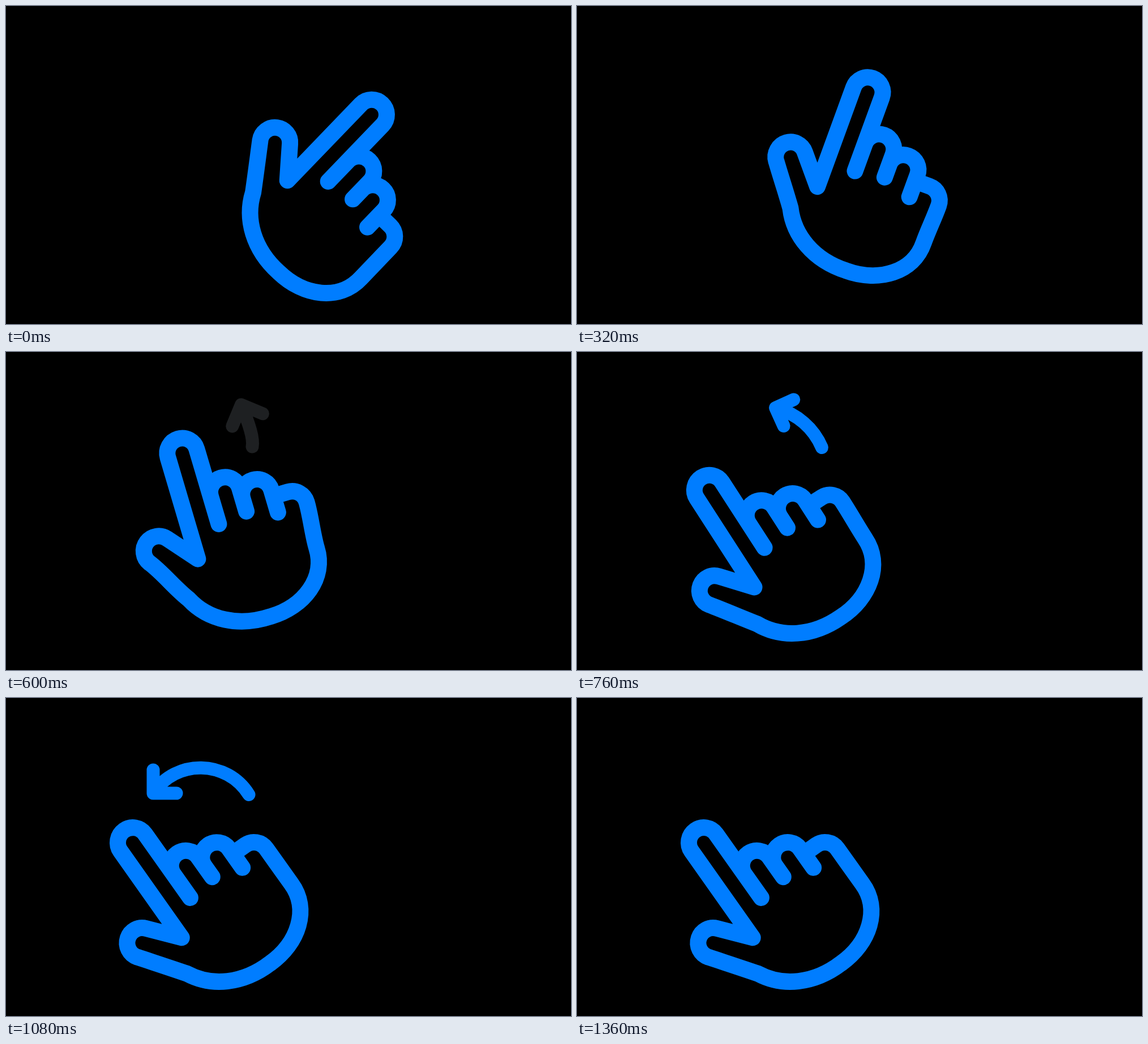
These frames come from a looping animation (998 px wide and 561 px high, 1.92 s). An HTML page with a canvas:

```html
<!DOCTYPE html>
<html lang="en">
<head>
<meta charset="utf-8">
<title>Swipe gesture</title>
<style>
  html, body { margin: 0; width: 100%; height: 100%; overflow: hidden; background: #000; }
  canvas { display: block; }
</style>
</head>
<body>
<canvas id="stage" width="998" height="561"></canvas>
<script>
const ctx = document.getElementById('stage').getContext('2d');
const LOOP = 1920, STEP = 40;
const RAD = Math.PI / 180;
const HUE = 210.6;
const PIVOT = { x: 473.2, y: 478.1 };
const TIP = 26.5; // fingertip radius; neighbours stand two radii apart
const SWING_END = 925;

const ramp = (t, from, to) => Math.min(1, Math.max(0, (t - from) / (to - from)));
const smooth = (t, from, to) => {
  const u = ramp(t, from, to);
  return u * u * (3 - 2 * u);
};
const mix = (a, b, p) => a + (b - a) * p;
const color = fade => `hsl(${HUE} ${100 * fade * fade}% ${50 * fade}%)`;

// Swings past the resting angle, then settles back.
const handAngle = t =>
  44 - 83.8 * smooth(t, -10, SWING_END) + 4.5 * smooth(t, SWING_END, 1085);

// The knuckles wobble vertically against the palm while the hand swings.
const wobble = t => t < 780 ? 16.3 * Math.exp(-t / 855) * Math.sin(2 * Math.PI * t / 780) : 0;

// The hand is built upright, with the pivot at the heel of the palm.
function drawHand(t) {
  const angle = handAngle(t) * RAD;
  const cos = Math.cos(angle), sin = Math.sin(angle);
  const sway = -2.5 * Math.sin(Math.PI * ramp(t, 0, SWING_END));
  const shiftY = wobble(t);
  const shiftX = -0.25 * shiftY - sway;
  const ox = shiftX * cos + shiftY * sin;
  const oy = shiftY * cos - shiftX * sin;
  const line = (x, y) => ctx.lineTo(x + ox, y + oy);
  const tip = (x, y, from = 180, to = 360) =>
    ctx.arc(x + ox, y + oy, TIP, from * RAD, to * RAD);

  ctx.save();
  ctx.translate(PIVOT.x + sway, PIVOT.y);
  ctx.rotate(angle);
  ctx.beginPath();

  // little finger, palm, thumb
  ctx.moveTo(68.4 + ox, -207.7 + oy);
  tip(85.2, -181.2, 270);
  ctx.bezierCurveTo(111.7 + ox, -156 + oy, 112, -130, 112, -105);
  ctx.bezierCurveTo(113, -50, 62, -12, 0, -12);
  ctx.bezierCurveTo(-60, -10, -108, -38, -130, -82);
  ctx.bezierCurveTo(-148, -107, -166.4 + ox, -131.7 + oy, -184.6 + ox, -156.5 + oy);
  tip(-163.3, -172.1, 143.8, 320.2);
  line(-101, -139.3);

  // index, middle and ring: fingertip height and end of the right edge
  [[-326, -188], [-238.6, -195.5], [-219, -178]].forEach(([top, base], i) => {
    const x = -74.5 + 2 * TIP * i;
    if (i) ctx.moveTo(x - TIP + ox, top + oy);
    tip(x, top);
    line(x + TIP, base);
  });

  ctx.lineWidth = 29;
  ctx.strokeStyle = color(1);
  ctx.stroke();
  ctx.restore();
}

// The head travels left and dives while the shaft bends behind it.
function drawArrow(t) {
  const fade = ramp(t, 560, 720) - ramp(t, 1120, 1360);
  if (fade <= 0) return;
  const p = smooth(t, 600, 960);
  const dive = p ** 3;
  const heading = mix(247.6, 135, p);
  const x = mix(415.5, 260, p), y = mix(93, 168, dive);
  const behind = (length, turn) => {
    const a = (heading + 180 + turn) * RAD;
    return [x + length * Math.cos(a), y + length * Math.sin(a)];
  };
  const barb = 41 - 24 * p * (1 - p);

  ctx.beginPath();
  ctx.moveTo(mix(435, 429, p), mix(167, 170.5, p));
  ctx.bezierCurveTo(
    mix(437.7, 390.6, p), mix(153, 108.8, p),
    ...behind(mix(38, 73, dive), -12 * p),
    x, y);
  ctx.moveTo(...behind(barb, -45));
  ctx.lineTo(x, y);
  ctx.lineTo(...behind(barb, 45));
  ctx.lineWidth = 23;
  ctx.strokeStyle = color(fade);
  ctx.stroke();
}

function draw(now) {
  const t = Math.floor((now % LOOP) / STEP) * STEP;
  ctx.fillStyle = '#000';
  ctx.fillRect(0, 0, 998, 561);
  ctx.lineCap = ctx.lineJoin = 'round';
  drawArrow(t);
  drawHand(t);
}

let start;
function tick(now) {
  start ??= now;
  draw(now - start);
  requestAnimationFrame(tick);
}
draw(0);
requestAnimationFrame(tick);
</script>
</body>
</html>
```
